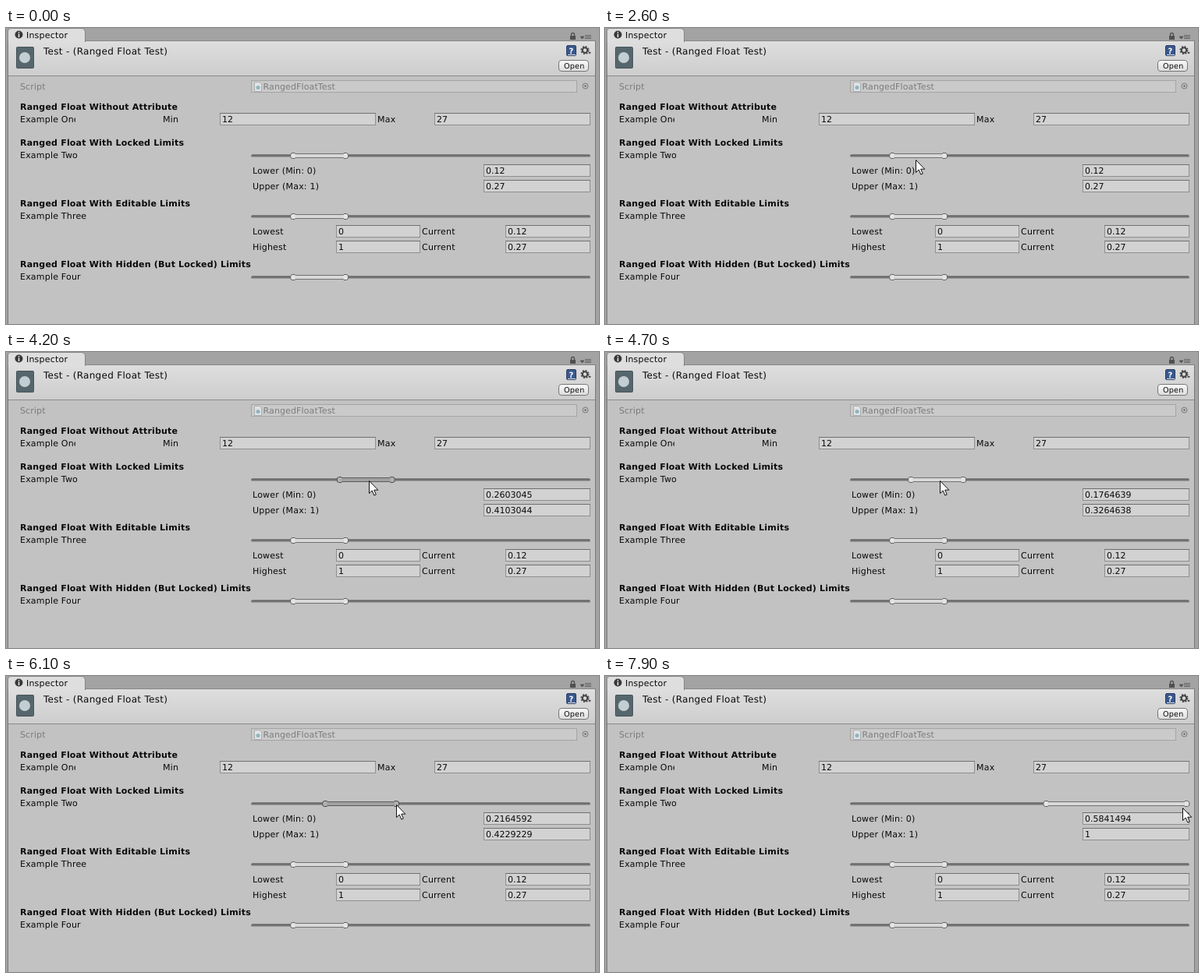
Recreate the animation shown at these times as an HTML page. Size 760 px wide and 380 px high, loop 8 s.

```html
<!DOCTYPE html>
<html lang="en">
<head>
<meta charset="utf-8">
<title>Inspector</title>
<style>
html, body { margin: 0; width: 760px; height: 380px; overflow: hidden; background: #c2c2c2; }
svg { display: block; }
text { font: 11px "DejaVu Sans", Verdana, sans-serif; letter-spacing: .2px; fill: #0a0a0a; text-rendering: geometricPrecision; white-space: pre; }
.bold { font-weight: bold; }
.title { font-size: 12px; letter-spacing: .3px; }
.value { letter-spacing: 0; }
.dim { fill: #7c7c7c; letter-spacing: .12px; }
.small { font-size: 9.6px; }
.mark { font-size: 10px; fill: #fff; }
.field { fill: #d2d2d2; stroke: #8f8f8f; }
.range rect { fill: #d9d9d9; stroke: #707070; }
.range path { fill: #e4e4e4; stroke: #606060; }
.held rect { fill: #a0a0a0; stroke: #5c5c5c; }
.held path { fill: #b0b0b0; stroke: #4c4c4c; }
</style>
</head>
<body>
<svg width="760" height="380" viewBox="0 0 760 380">
  <defs>
    <linearGradient id="head" x2="0" y2="1">
      <stop stop-color="#dedede"/><stop offset="1" stop-color="#cdcdcd"/>
    </linearGradient>
    <linearGradient id="button" x2="0" y2="1">
      <stop stop-color="#fafafa"/><stop offset="1" stop-color="#dcdcdc"/>
    </linearGradient>
    <clipPath id="nameColumn"><rect x="18" y="108" width="71" height="18"/></clipPath>
  </defs>

  <!-- window frame and tab -->
  <rect width="760" height="380" fill="#a3a3a3"/>
  <rect x="2" y="17" width="753" height="363" fill="#c2c2c2"/>
  <rect x="3" y="17" width="752" height="44" fill="url(#head)"/>
  <path d="M2 61.5H755" stroke="#8b8b8b"/>
  <path d="M2.5 17V380M755.5 17V380" stroke="#777"/>
  <path d="M100 16.5H756" stroke="#878787"/>
  <path d="M2.5 18V4Q2.5.5 6 .5H97Q100.5.5 101.5 4V18" fill="#dedede" stroke="#858585"/>
  <circle cx="16.5" cy="8.5" r="5" fill="#383838"/>
  <path d="M16.5 5V6.500M16.5 7.5V12" stroke="#eee" stroke-width="1.5"/>

  <!-- header icons -->
  <rect x="13.5" y="24.5" width="22" height="27" rx="1" fill="#56666d" stroke="#46535a"/>
  <circle cx="24" cy="38" r="7" fill="#c3ced2"/>
  <rect x="723" y="10" width="7" height="5" fill="#505050"/>
  <path d="M724.5 10V8.5a2 2 0 0 1 4 0V10" fill="none" stroke="#505050" stroke-width="1.3"/>
  <path d="M736 11H741L738.5 14ZM742 9.5H750M742 11.5H750M742 13.5H750" fill="#555" stroke="#555" stroke-width=".8"/>
  <rect x="718.5" y="22.5" width="12" height="13" rx="1.5" fill="#39598e" stroke="#2c3e61"/>
  <path d="M720 34.5H730" stroke="#e5e9f0"/>
  <text x="721.5" y="32.5" class="bold mark">?</text>
  <circle cx="742" cy="28.5" r="3.2" fill="none" stroke="#444" stroke-width="2"/>
  <circle cx="742" cy="28.5" r="4.7" fill="none" stroke="#444" stroke-width="1.8" stroke-dasharray="1.9 1.79"/>
  <path d="M746 31H750L748 33.5Z" fill="#444"/>
  <rect x="708.5" y="41.5" width="38" height="14" rx="3.5" fill="url(#button)" stroke="#777"/>

  <!-- script reference -->
  <rect x="314.5" y="67.5" width="417" height="15" fill="#cacaca" stroke="#a5a5a5"/>
  <path d="M318.5 69.5H325L327.5 72V81.5H318.5Z" fill="#dfe3e5" stroke="#a9b0b3"/>
  <circle cx="323" cy="76.5" r="2.5" fill="#8fb3bd"/>
  <circle cx="742.5" cy="74.5" r="3.5" fill="none" stroke="#777"/>
  <circle cx="742.5" cy="74.5" r="1.2" fill="#666"/>

  <g id="fields"></g>
  <g id="labels"></g>
  <g id="sliders"></g>
  <path id="cursor" d="M.5.5V16.5L4.2 13L6.8 19L9.3 18L6.7 12.2H11.8Z" fill="#fff" stroke="#111"/>
</svg>
<script>
const byId = id => document.getElementById(id);

const label = (text, x, y, cls = "") =>
  `<text x="${x}" y="${y}" class="${cls}">${text}</text>`;
const section = (title, name, y) =>
  label(title, 18, y, "bold") + label(name, 18, y + 16);

byId("labels").innerHTML =
  label("Inspector", 26, 13) +
  label("Test - (Ranged Float Test)", 48, 34, "title") +
  label("Open", 715, 52, "small") +
  label("Script", 18, 79, "dim") + label("RangedFloatTest", 329.5, 79, "dim") +
  label("Ranged Float Without Attribute", 18, 105, "bold") +
  `<g clip-path="url(#nameColumn)">${label("Example One", 18, 121)}</g>` +
  label("Min", 201, 121) + label("Max", 476, 121) +
  section("Ranged Float With Locked Limits", "Example Two", 151) +
  label("Lower (Min: 0)", 316, 187) + label("Upper (Max: 1)", 316, 207) +
  section("Ranged Float With Editable Limits", "Example Three", 229) +
  label("Lowest", 316, 265) + label("Current", 533, 265) +
  label("Highest", 316, 285) + label("Current", 533, 285) +
  section("Ranged Float With Hidden (But Locked) Limits", "Example Four", 307);

const field = (left, right, y, value, id = "") =>
  `<rect class="field" x="${left + .5}" y="${y + .5}" width="${right - left - 1}" height="15"/>
   <path d="M${left} ${y + .5}H${right}" stroke="#707070"/>
   <text class="value" ${id && `id="${id}"`} x="${left + 3}" y="${y + 12}">${value}</text>`;

byId("fields").innerHTML =
  field(274, 474, 109, "12") + field(549, 749, 109, "27") +
  field(612, 749, 175, "0.12", "lower") + field(612, 749, 195, "0.27", "upper") +
  field(423, 531, 253, "0") + field(640, 749, 253, "0.12") +
  field(423, 531, 273, "1") + field(640, 749, 273, "0.27");

const thumb = `<path d="M3.5-3.5H0Q-2.5-3.5-2.5 0T0 3.5H3.5"/>`;
byId("sliders").innerHTML = [164, 242, 320].map(y =>
  `<g transform="translate(0 ${y})">
    <rect x="314" y="-1.5" width="435" height="3" rx="1.5" fill="#777"/>
    <path d="M315-1H748" stroke="#606060"/>
    <g class="range"><rect y="-2.5" height="5"/>${thumb}${thumb}</g>
  </g>`).join("");

const ranges = document.querySelectorAll(".range");

function setRange(range, lo, hi, held) {
  const left = 316 + 425 * lo, right = 321.5 + 425 * hi;
  const [bar, start, end] = range.children;
  bar.setAttribute("x", left);
  bar.setAttribute("width", right - left);
  start.setAttribute("transform", `translate(${left})`);
  end.setAttribute("transform", `translate(${right}) scale(-1 1)`);
  range.classList.toggle("held", held);
}
ranges.forEach(range => setRange(range, .12, .27, false));

// time, x, y of the free pointer
const path = [
  [200, 739, 47], [500, 440, 46], [900, 113, 35], [1000, 113, 35],
  [1200, 118, 35], [1700, 214, 48], [1900, 174, 44], [2300, 470, 190],
  [2400, 499, 209], [2600, 398, 169], [2800, 406, 166]
];
// time, pointer distance from the left thumb
const grip = [
  [2800, 39], [4700, 38], [5000, 34], [5300, 34],
  [5700, 69], [6100, 92.5], [6500, 182], [6900, 164], [7700, 164], [7900, 176.2]
];
// time, lower value
const lower = [
  [3100, .12], [3500, .2023433], [3900, .2812647], [4100, .2812647],
  [4600, .1764639], [5000, .1764639], [5300, .2164592], [6900, .2164592], [7700, .5841494]
];
// time, upper minus lower
const span = [
  [3100, .15], [3500, .1499998], [4600, .1499999],
  [5700, .1499999], [6100, .2064637], [6500, .4158506]
];
const drags = [[3100, 4700], [5000, 5400], [5700, 6600], [6900, 7800]];

function at(keys, t, column = 1) {
  const next = keys.findIndex(key => key[0] > t);
  if (next === 0) return keys[0][column];
  if (next < 0) return keys[keys.length - 1][column];
  const a = keys[next - 1], b = keys[next];
  return a[column] + (b[column] - a[column]) * (t - a[0]) / (b[0] - a[0]);
}

const LOOP = 8000, STEP = 100;
const began = performance.now();
const cursor = byId("cursor");

function draw(now) {
  const t = Math.floor(Math.max(0, now - began) % LOOP / STEP) * STEP;
  const lo = at(lower, t), hi = lo + at(span, t);
  const free = t < 2800;
  const x = free ? at(path, t) : 316 + 425 * lo + at(grip, t);
  const y = free ? at(path, t, 2) : t < 4200 ? 166 : t < 6500 ? 165 : t < 7900 ? 168 : 169;
  cursor.setAttribute("visibility", t < 200 ? "hidden" : "visible");
  cursor.setAttribute("transform", `translate(${Math.round(x)} ${Math.round(y)})`);
  setRange(ranges[0], lo, hi, drags.some(([from, to]) => t >= from && t < to));
  byId("lower").textContent = +lo.toFixed(7);
  byId("upper").textContent = +hi.toFixed(7);
  requestAnimationFrame(draw);
}
draw(began);
</script>
</body>
</html>
```
